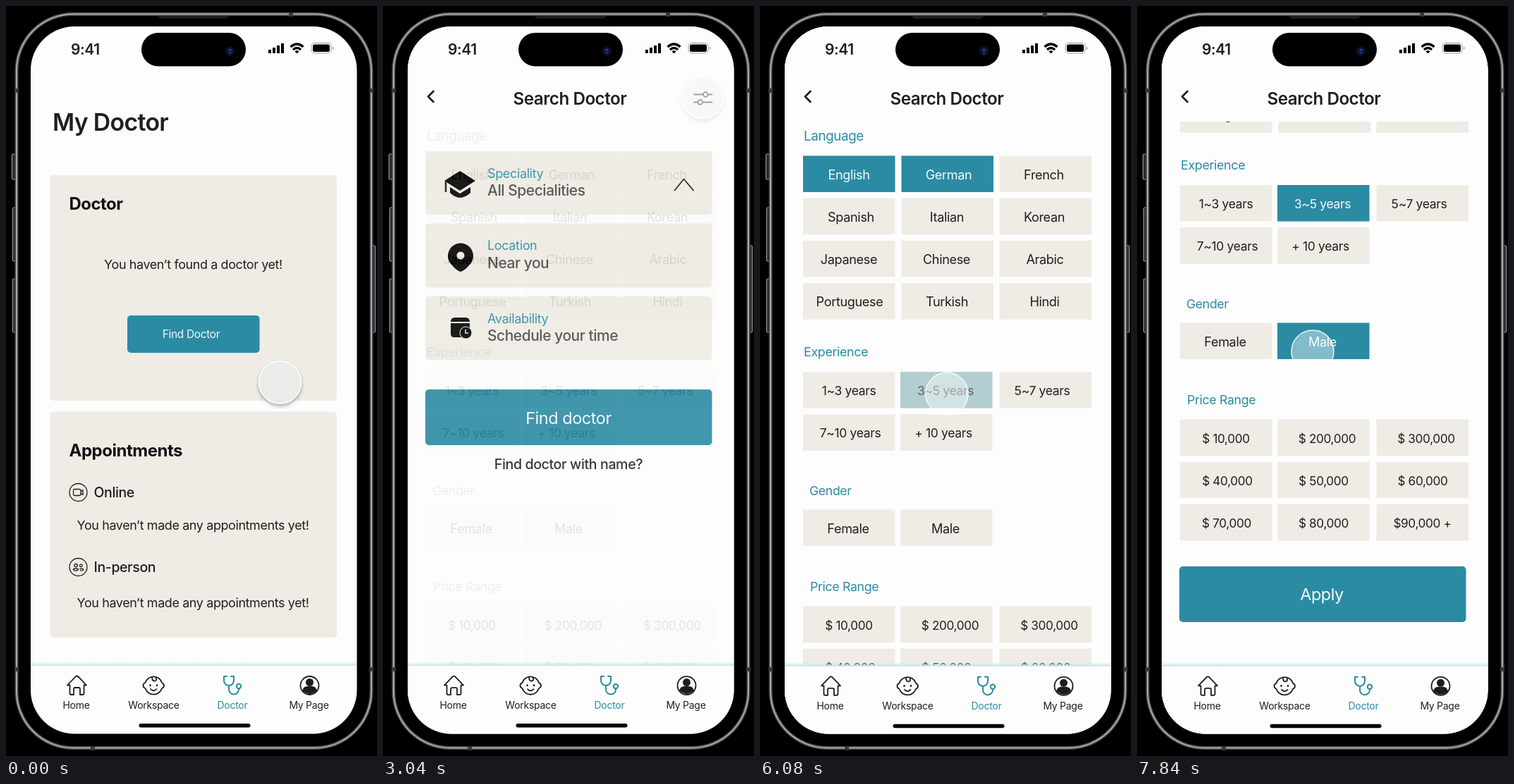
These frames come from a looping animation (526 px wide and 1064 px high, 8 s). An HTML page:

```html
<!DOCTYPE html>
<html lang="en">
<head>
<meta charset="utf-8">
<title>Doctor search</title>
<style>
  html, body { margin: 0; height: 100%; overflow: hidden; background: #000; }
  svg { display: block; width: 100vw; height: 100vh; }
  text { font-family: Inter, "Open Sans", sans-serif; letter-spacing: -.02em; fill: #1f1f21; }
  .center { text-anchor: middle; }
  .medium { font-weight: 500; }
  .semi { font-weight: 600; }
  .bold { font-weight: 700; fill: #111; }
  .gray { fill: #474747; }
  .teal { fill: #2b8ba3; }
  .white { fill: #f6fafb; }
  .beige { fill: #eeece4; }
  .screen { fill: #fefdfe; }
  .line { fill: none; stroke: #1c1c1e; stroke-width: 1.8; stroke-linecap: round; stroke-linejoin: round; }
  .thin { stroke-width: 1.3; }
  .thick { stroke-width: 2.6; }
  .active { stroke: #2b8ba3; stroke-width: 2; }
  #rest { filter: drop-shadow(0 3px 2.5px rgba(0, 0, 0, .3)); }
</style>
</head>
<body>
<svg viewBox="0 0 526 1064">
  <defs>
    <clipPath id="viewport"><rect x="35" y="164" width="462" height="772"/></clipPath>
    <linearGradient id="glow" x2="0" y2="1">
      <stop stop-color="#d3eaf0" stop-opacity="0"/><stop offset="1" stop-color="#c5e2ea"/>
    </linearGradient>
  </defs>

  <g id="phone">
    <g fill="#2b2b2d" stroke="#a5a5a7">
      <rect x="8.5" y="210" width="5" height="36" rx="1"/>
      <rect x="9.5" y="286" width="4" height="76" rx="1"/>
      <rect x="9.5" y="387" width="4" height="76" rx="1"/>
      <rect x="519.5" y="340" width="4" height="123" rx="1"/>
    </g>
    <rect x="15" y="11.500" width="503" height="1041" rx="80" stroke="#4a4a4c" stroke-width="5"/>
    <rect x="15" y="11.500" width="503" height="1041" rx="80" fill="none" stroke="#a9a9aa" stroke-width="2"/>
    <path d="M12 120h6M515 120h6M12 941h6M515 941h6M404 9v6M123 1050v6" stroke="#39393a" stroke-width="6"/>
    <path d="M215 14h102q-2 4-6 4h-90q-4 0-6-4" fill="#1d1d1f"/>
  </g>

  <g id="pages"></g>

  <g id="status">
    <rect x="192" y="38" width="148" height="47.500" rx="23.700"/>
    <circle cx="317.500" cy="64" r="7" fill="#0b0d22"/>
    <circle cx="317.500" cy="64" r="4" fill="#141b49"/>
    <circle cx="317.500" cy="62" r="1.500" fill="#254a96"/>
    <circle cx="317.500" cy="67" r="1" fill="#254a96"/>
    <text x="92" y="69" font-size="21" class="semi">9:41</text>
    <path d="M374 62v5M380 59v8M386 56v11M392 53v14" stroke="#000" stroke-width="4"/>
    <g fill="none" stroke="#000" stroke-width="3.200">
      <path d="M403.500 58q9-8 18 0M407 62q5.500-5 11 0"/>
      <path d="M412.500 67l-2.500-2.500q2.500-2 5 0z" fill="#000" stroke-width="1"/>
    </g>
    <rect x="433" y="52.500" width="28" height="14.500" rx="4.500" fill="none" stroke="#999"/>
    <rect x="435" y="54.500" width="24" height="10.500" rx="2.800"/>
    <path d="M463 57.500q3 2 0 5z" fill="#999"/>
  </g>

  <g id="nav">
    <rect x="35" y="930" width="462" height="6" fill="url(#glow)"/>
    <path class="line" d="M87 963.500L98.500 951.500Q100.500 949.500 102.500 951.500L114 963.500H110.500V975Q110.500 977 108.500 977H105V969Q105 967 103 967H98Q96 967 96 969V977H92.500Q90.500 977 90.500 975V963.500Z"/>
    <g class="line">
      <path d="M197.500 960a12.300 12.300 0 0 1 23.500 0q3 1 3 4t-3 4a12.300 12.300 0 0 1-23.500 0q-3-1-3-4t3-4M207 952q0 6 4 5.500q3.500-1 1.500-4M205 969q4.200 4.500 8.500 0"/>
      <path d="M204.500 963.500v.5M214 963.500v.5" stroke-width="2.500"/>
    </g>
    <g class="line active">
      <path d="M313 951h-4v6a7 7 0 0 0 14 0v-6h-4M316 964v5a7 7 0 0 0 14 1v-2"/>
      <circle cx="330" cy="965" r="3.200"/>
    </g>
    <circle class="line" cx="430.500" cy="964" r="13"/>
    <circle cx="430.500" cy="959.500" r="5.500" fill="#1c1c1e"/>
    <path d="M420 971q2-6 7-6h7q5 0 7 6q-10 10-21 0" fill="#1c1c1e"/>
    <g class="center" font-size="14">
      <text x="99.500" y="997">Home</text>
      <text x="209.500" y="997">Workspace</text>
      <text x="321" y="997" class="teal">Doctor</text>
      <text x="429.500" y="997">My Page</text>
    </g>
    <rect x="188.500" y="1018" width="158" height="5.500" rx="2.750"/>
  </g>

  <g id="cursor">
    <circle id="press" r="30" fill="#fff" fill-opacity=".41" stroke="#fff" stroke-opacity=".85" stroke-width="1.500"/>
    <circle id="rest" r="30" fill="#ebebea" stroke="#fff" stroke-width="1.500"/>
  </g>
</svg>

<script>
const LOOP = 8000;
const $ = id => document.getElementById(id);

const text = (x, y, size, str, cls = '') =>
  `<text x="${x}" y="${y}" font-size="${size}" class="${cls}">${str}</text>`;
const box = (x, y, w, h, cls, r = 5) =>
  `<rect x="${x}" y="${y}" width="${w}" height="${h}" rx="${r}" class="${cls}"/>`;
const line = (d, cls = '') => `<path class="line ${cls}" d="${d}"/>`;
const page = (id, content) =>
  `<g id="${id}"><rect class="screen" x="35" y="29" width="462.500" height="1003.500" rx="62"/>${content}</g>`;

const header = line('M71.500 121L64 128.500L71.500 136', 'thick') +
  text(265, 139.5, 24.2, 'Search Doctor', 'semi center');

const home = text(66, 176.5, 33.8, 'My Doctor', 'semi') +
  box(62.5, 240, 406.5, 320, 'beige') + box(62.5, 575.5, 406.5, 320.5, 'beige') +
  text(89.5, 289, 23.9, 'Doctor', 'bold') +
  text(265.5, 373, 17.9, 'You haven’t found a doctor yet!', 'center') +
  box(172, 439, 187.5, 53, 'teal') + text(262.5, 470.5, 15.4, 'Find Doctor', 'center white') +
  text(89.5, 639, 24, 'Appointments', 'bold') +
  [['Online', 690], ['In-person', 796]].map(([name, y]) =>
    `<circle class="line thin" cx="102.500" cy="${y}" r="12.500"/>` +
    text(124.5, y + 7, 19.5, name, 'medium')).join('') +
  line('M97 685.500h7q2 0 2 2v5q0 2-2 2h-7q-1.500 0-1.500-2v-5q0-2 1.500-2M106 689l3-2.500v7l-3-2.500', 'thin') +
  line('M97 793.500a2.200 2.200 0 1 1 4.400 0a2.200 2.200 0 1 1-4.400 0M104.500 794a1.800 1.800 0 1 1 3.600 0a1.800 1.800 0 1 1-3.600 0M95.500 799.500q0-1.500 3.500-1.500t3.500 1.500t-3.500 1.500t-3.500-1.500M105 798.500q4.500-1 4.500 1q0 1.500-4 1.300', 'thin') +
  text(265, 743, 17.9, 'You haven’t made any appointments yet!', 'center') +
  text(265, 852.5, 17.9, 'You haven’t made any appointments yet!', 'center');

const search = header +
  line('M441 125.500h13M461 125.500h5.500M441 136.500h5M454 136.500h12.500M454 125.500a3.300 3.300 0 1 0 6.600 0a3.300 3.300 0 1 0-6.600 0M446.500 136.500a3.300 3.300 0 1 0 6.600 0a3.300 3.300 0 1 0-6.600 0') +
  [['Speciality', 'All Specialities', 206, 90], ['Location', 'Near you', 308.5, 91],
   ['Availability', 'Schedule your time', 412, 90.5]].map(([label, value, y, h]) =>
    box(60, y, 406.5, h, 'beige') + text(148, y + 37.5, 18, label, 'teal') +
    text(148, y + 63, 20.9, value, 'medium gray')).join('') +
  line('M413.500 261.500L426.500 245.500L440 261.500') +
  `<path d="M109 234l22 14-22 14-22-14zM95 257l14 9 15-9v8q-15 14-29 0z"/>` +
  line('M89 250v13', 'thick') +
  `<path d="M110 377q-5-1-12-9a18 18 0 1 1 24 0q-7 8-12 9"/><circle class="beige" cx="110" cy="354" r="5.500"/>
   <path d="M96 448q0-6 6-6h15q6 0 6 6zM96 450h27v14l-8 6h-14q-5 0-5-5z"/>
   <circle cx="117.500" cy="463.500" r="9" class="beige"/><circle cx="117.500" cy="463.500" r="8"/>
   <path d="M117 459v5h4" fill="none" stroke="#eeece4" stroke-width="1.500"/>` +
  box(60, 544, 406.5, 79, 'teal') + text(263, 593, 23.5, 'Find doctor', 'center white') +
  text(263, 657, 19.6, 'Find doctor with name?', 'medium center');

// Time at which each option turns selected.
const selectedAt = { English: 4080, German: 4960, '3~5 years': 6030, Male: 7020 };

function chip(label, textX, col, y, size) {
  const x = [61, y < 500 ? 200.5 : 199, 339.5][col];
  const face = (bg, ink) => box(x, y, 130.5, 51.5, bg, 0) + text(textX, y + 33, size, label, 'center ' + ink);
  const on = selectedAt[label];
  return face('beige', '') + (on ? `<g class="chosen" data-at="${on}">${face('teal', 'white')}</g>` : '');
}

// Rows are "label@textCentre" cells.
const chips = (y, size, ...rows) => rows.map((row, r) => row.split('|').map((cell, col) => {
  const [label, x] = cell.split('@');
  return chip(label, x, col, y + r * 60.2, size);
}).join('')).join('');

const filters = header + `<g clip-path="url(#viewport)"><g id="list">` +
  text(62, 190.5, 18.8, 'Language', 'teal') +
  chips(212.5, 18.1, 'English@126|German@267.5|French@402.5', 'Spanish@129|Italian@265|Korean@403',
    'Japanese@126|Chinese@264.5|Arabic@404', 'Portuguese@127|Turkish@265|Hindi@403.5') +
  text(62, 497, 17.9, 'Experience', 'teal') +
  chips(519, 17.5, '1~3 years@126|3~5 years@263|5~7 years@400', '7~10 years@128|+ 10 years@260') +
  text(70, 694, 17.7, 'Gender', 'teal') +
  chips(714.5, 18.1, 'Female@125|Male@263') +
  text(71, 829.5, 17.8, 'Price Range', 'teal') +
  chips(851.5, 17.2, '$ 10,000@126|$ 200,000@269.5|$ 300,000@410', '$ 40,000@128|$ 50,000@264.5|$ 60,000@405',
    '$ 70,000@127|$ 80,000@264.5|$90,000 +@404.5') +
  box(60, 1060, 406.5, 79, 'teal') + text(262, 1108, 23.5, 'Apply', 'center white') + '</g></g>';

$('pages').innerHTML = page('home', home) + page('search', search) + page('filters', filters);
const chosen = document.querySelectorAll('.chosen');

// Pointer path: time, x, y, pressure.
const path = [
  [0, 388.5, 534, 0], [720, 388.5, 534, 0], [1220, 300.5, 474, 0], [1420, 300.5, 474, 1], [1620, 300.5, 474, 1],
  [1800, 300.5, 474, 0], [2240, 385.5, 256, 0], [2620, 453, 130, 0], [2800, 453, 130, 1], [2980, 453, 130, 1],
  [3160, 453, 130, 0], [3720, 125, 220, 0], [3840, 125, 220, .25], [3980, 125, 220, 1], [4160, 125, 220, 1],
  [4340, 125, 220, 0], [4740, 251, 228, 0], [4880, 251, 228, 1], [5060, 251, 228, 1], [5280, 251, 280, .28],
  [5760, 265, 550, 0], [5920, 265, 550, 1], [6100, 265, 550, 1], [6280, 265, 560, 0], [6720, 277, 750, 0],
  [6860, 277, 750, 1], [7100, 277, 750, 1], [7380, 249, 755, 1], [7440, 249, 755, 1], [7820, 249, 490, 1],
  [LOOP, 249, 490, 1]
];

// Monotone cubic interpolation: smooth through the points, still where they repeat.
function pointer(t) {
  const i = Math.max(1, path.findIndex(p => p[0] > t));
  const a = path[i - 1], b = path[i], dt = b[0] - a[0], u = (t - a[0]) / dt;
  const slope = (k, c) => k < 1 || k >= path.length ? 0 : (path[k][c] - path[k - 1][c]) / (path[k][0] - path[k - 1][0]);
  const tangent = (k, c) => {
    const p = slope(k, c), q = slope(k + 1, c);
    return p * q > 0 ? 2 * p * q / (p + q) : 0;
  };
  return [1, 2, 3].map(c => a[c] + (b[c] - a[c]) * u * u * (3 - 2 * u) +
    dt * u * (1 - u) * ((1 - u) * tangent(i - 1, c) - u * tangent(i, c)));
}

const fade = (t, start, length) => {
  const u = Math.min(1, Math.max(0, (t - start) / length));
  return u * u * (3 - 2 * u);
};

function draw(now) {
  const t = now % LOOP;
  const [x, y, press] = pointer(t);
  const filtersIn = fade(t, 3000, 200);
  $('search').setAttribute('opacity', fade(t, 1580, 180));
  $('filters').setAttribute('opacity', filtersIn);
  $('nav').setAttribute('transform', `translate(0 ${filtersIn * .8})`);
  chosen.forEach(e => e.setAttribute('opacity', fade(t, +e.dataset.at, 140)));
  const scroll = t > 7400 ? 755 - y : 0;
  $('list').setAttribute('transform', `translate(0 ${-scroll})`);
  $('cursor').setAttribute('transform', `translate(${x} ${y})`);
  $('rest').setAttribute('opacity', 1 - press);
  requestAnimationFrame(draw);
}
requestAnimationFrame(draw);
</script>
</body>
</html>
```
